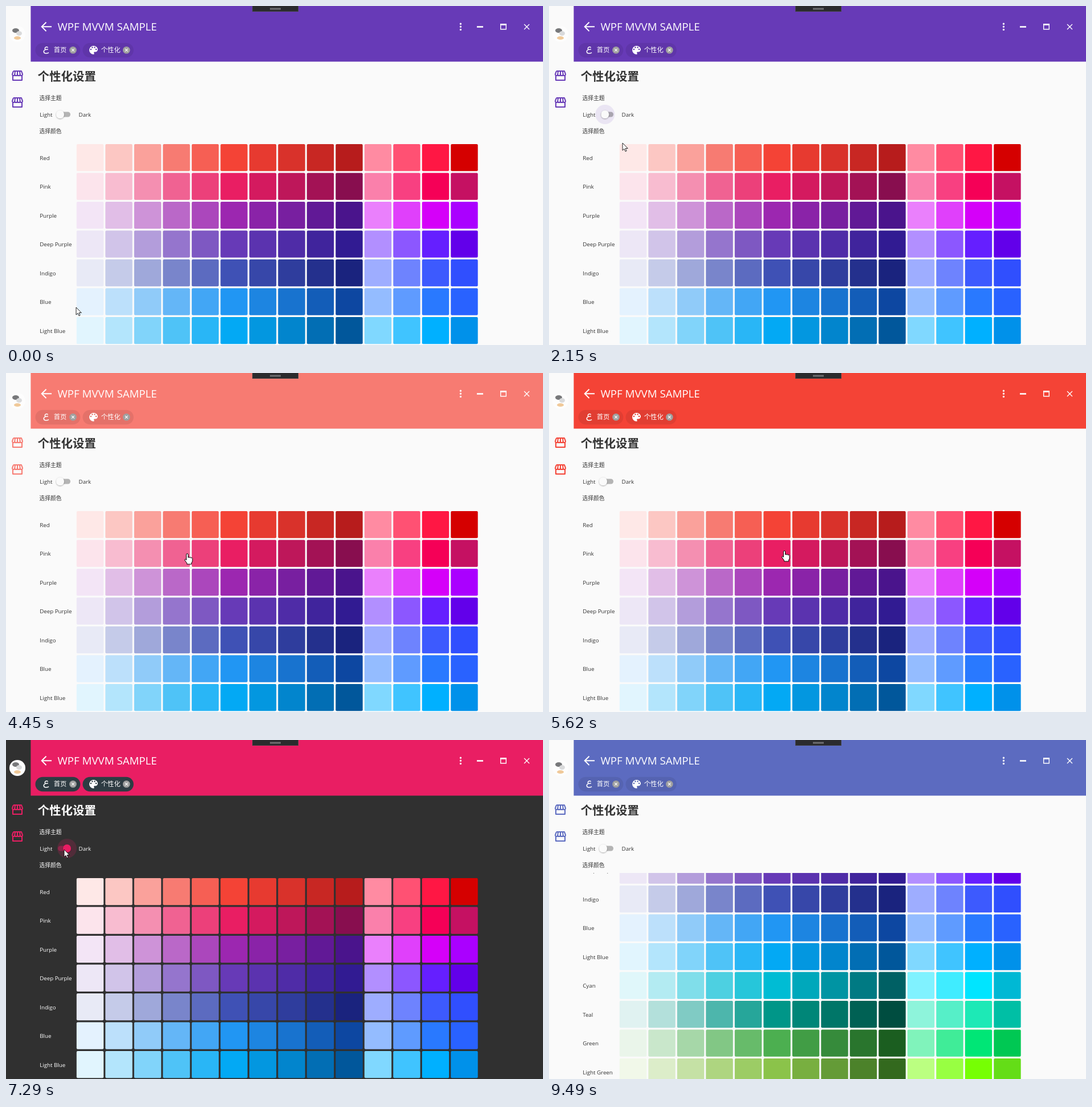
Recreate the animation shown at these times as an HTML page. Size 942 by 594 pixels, loop 9.77 s.

```html
<!DOCTYPE html>
<html lang="zh">
<head>
<meta charset="utf-8">
<title>Theme settings</title>
<style>
html, body { margin: 0; width: 100%; height: 100%; overflow: hidden; background: #fafafa; }
svg { display: block; width: 942px; height: 594px; font-family: "Open Sans", "Noto Sans CJK SC", "Noto Sans CJK", sans-serif; }
.cjk { font-family: "Noto Sans CJK SC", "Noto Sans CJK", sans-serif; }
.label { font-size: 9.75px; }
.line { fill: none; stroke-linejoin: round; }
</style>
</head>
<body>
<svg viewBox="0 0 942 594">
  <defs>
    <clipPath id="view"><rect x="43" y="233" width="899" height="361"/></clipPath>
    <clipPath id="cell"><rect id="cellRect" width="47.4" height="47.4" rx="2"/></clipPath>
    <filter id="soft" x="-50%" y="-50%" width="200%" height="200%">
      <feDropShadow dx="0" dy=".8" stdDeviation=".9" flood-opacity=".4"/>
    </filter>
    <path id="store" class="line" stroke-width="2" transform="translate(-12 -12)" d="M5 4H19L20.9 9.1C21.4 12.9 17.2 13 16.7 9.7L16 4M16.7 9.7C16.6 12.9 12 12.9 12 9.7V4M12 9.7C12 12.9 7.4 12.9 7.3 9.7L8 4M7.3 9.7C6.8 13 2.6 12.9 3.1 9.1L5 4M4 12V20H20V12"/>
    <g id="remove">
      <circle r="6.3" fill="#a0a0a0"/>
      <path d="M-2.4-2.4L2.4 2.4M2.4-2.4L-2.4 2.4" stroke="#fff" stroke-width="1.2"/>
    </g>
  </defs>

  <rect id="page" width="942" height="594"/>
  <rect id="header" x="43.4" width="899" height="97.5"/>

  <circle cx="20" cy="49" r="14" fill="#fdfdfd"/>
  <ellipse cx="17" cy="43" rx="6" ry="4" fill="#77787a"/>
  <ellipse cx="23" cy="48" rx="5" ry="4" fill="#d9dadb"/>
  <ellipse cx="20" cy="56" rx="6" ry="3" fill="#f0c999"/>

  <g id="icons">
    <use href="#store" x="20" y="122"/>
    <use href="#store" x="20" y="169"/>
  </g>

  <g fill="none" stroke="#fff">
    <path d="M80 36.3H63.5M70.5 28.5L62.7 36.3L70.5 44.1" stroke-width="2"/>
    <path d="M826 36.5H837" stroke-width="2.6"/>
    <path d="M867.7 33V40.8H877.3V33" stroke-width="1.4"/>
    <path d="M867 32.4H878" stroke-width="2.8"/>
    <path d="M909 32L918 41M918 32L909 41" stroke-width="1.4"/>
    <path d="M797.5 31.2V41.5" stroke-width="3.4" stroke-linecap="round" stroke-dasharray="0 5.1"/>
  </g>
  <text x="90.5" y="42.5" font-size="18.7" fill="#fff">WPF MVVM SAMPLE</text>

  <g id="chips">
    <rect x="51.5" y="64.8" width="78.8" height="25.4" rx="12.7"/>
    <rect x="134.5" y="64.8" width="89.3" height="25.4" rx="12.7"/>
  </g>
  <path class="line" stroke="#fff" stroke-width="1.5" d="M73.6 72.8C70.5 70.4 66.4 73.3 69.2 76.4L73.8 75.8M69.2 76.4C64.6 78.2 65.8 83 70 83Q73 83 75 81.6"/>
  <path fill="#fff" fill-rule="evenodd" transform="translate(143.5 67.2) scale(.833)" d="M12 3A9 9 0 0 0 12 21A1.5 1.5 0 0 0 13.5 19.5C13.5 19.1 13.35 18.8 13.1 18.5C12.9 18.2 12.7 17.9 12.7 17.5A1.5 1.5 0 0 1 14.2 16H16A5 5 0 0 0 21 11C21 6.6 17 3 12 3ZM16 10.5a1.5 1.5 0 1 0 3 0a1.5 1.5 0 1 0-3 0ZM13 6.5a1.5 1.5 0 1 0 3 0a1.5 1.5 0 1 0-3 0ZM8 6.5a1.5 1.5 0 1 0 3 0a1.5 1.5 0 1 0-3 0ZM5 10.5a1.5 1.5 0 1 0 3 0a1.5 1.5 0 1 0-3 0Z"/>
  <g class="cjk" fill="#fff" font-size="11.3">
    <text x="83.8" y="81.2">首页</text>
    <text x="166.8" y="81.2">个性化</text>
  </g>
  <use href="#remove" x="117.5" y="77.3"/>
  <use href="#remove" x="211.3" y="77.3"/>

  <rect x="432.5" y="-.5" width="80" height="10" fill="#2b2b2d" stroke="#434345"/>
  <rect x="463" y="3.5" width="19" height="3" fill="#6e6e70"/>

  <g id="ink">
    <text class="cjk" x="55.6" y="131" font-size="20.5" font-weight="700">个性化设置</text>
    <g class="label">
      <text class="cjk" x="58.6" y="165">选择主题</text>
      <text x="59.2" y="194">Light</text>
      <text x="127.6" y="194">Dark</text>
      <text class="cjk" x="58.6" y="222.5">选择颜色</text>
    </g>
    <g clip-path="url(#view)"><g id="grid" class="label"></g></g>
  </g>

  <circle id="halo" cy="190" r="17"/>
  <rect id="track" x="91" y="185.5" width="22" height="9" rx="4.5"/>
  <circle id="knob" cy="190" r="7" filter="url(#soft)"/>

  <g id="cursor" fill="#fff" stroke="#000">
    <path id="arrow" stroke-width="1.1" transform="scale(.78)" d="M0 0V16.8L3.8 13.2 6.4 19 9 17.9 6.5 12.2H11.8Z"/>
    <path id="hand" stroke-width="1" stroke-linejoin="round" d="M-1.7 1.2a1.6 1.6 0 0 1 3.2 0V6.5a1.4 1.4 0 0 1 2.7.3a1.3 1.3 0 0 1 2.6.6a1.2 1.2 0 0 1 2.2 1V13l-1.6 3V18H-.6V16.2L-4.4 11c-.6-1.4 1-2.3 2-1.2l.7.9Z"/>
  </g>
</svg>

<script>
const LOOP = 9770, LEFT = 123.8, TOP = 241.9, PITCH = 50.5, SIZE = 47.4;

// Each hue: main colour, darkest shade, accent, deep accent.
const HUES = {
  'Red': 'f44336 b71c1c ff1744 d50000',
  'Pink': 'e91e63 880e4f f50057 c51162',
  'Purple': '9c27b0 4a148c d500f9 aa00ff',
  'Deep Purple': '673ab7 311b92 651fff 6200ea',
  'Indigo': '3f51b5 1a237e 3d5afe 304ffe',
  'Blue': '2196f3 0d47a1 2979ff 2962ff',
  'Light Blue': '03a9f4 01579b 00b0ff 0091ea',
  'Cyan': '00bcd4 006064 00e5ff 00b8d4',
  'Teal': '009688 004d40 1de9b6 00bfa5',
  'Green': '4caf50 1b5e20 00e676 00c853',
  'Light Green': '8bc34a 33691e 76ff03 64dd17'
};
const TINTS = [.12, .3, .5, .7, .85, 1], DARKS = [.22, .44, .72, 1], ACCENTS = [.5, .75, 1];

// Cursor stops: time, x, y and whether it clicks there.
const STOPS = [
  [0, 123, 528], [930, 95, 190], [1180, 95, 190, true], [2011, 95, 190, true], [2150, 129, 240],
  [3250, 191, 270, true], [3280, 245.5, 273], [3650, 248, 274, true], [3930, 298, 275, true],
  [4450, 318, 317], [4800, 348, 274, true], [5200, 398, 274, true], [5500, 412, 322], [5620, 413, 312],
  [5720, 413, 312, true], [6590, 102, 192], [6876, 102, 192, true], [7830, 102, 192, true],
  [8480, 349, 417, true], [8610, 350.5, 472], [8890, 350.5, 472, true]
];

// The screen refreshes in bursts (first, last) about every STEP ms.
const STEP = 139;
const BURSTS = [[120, 930], [1180, 2150], [2270, 3280], [3430, 4450], [4570, 5500],
  [5620, 6590], [6740, 7690], [7830, 8610], [8910, 9490]];

const el = id => document.getElementById(id);
const set = (node, attrs) => { for (const k in attrs) node.setAttribute(k, attrs[k]); return node; };
const add = (parent, tag, attrs) =>
  parent.appendChild(set(document.createElementNS('http://www.w3.org/2000/svg', tag), attrs));
const clamp = v => Math.max(0, Math.min(1, v));
const mix = (a, b, p) => a + (b - a) * p;
const ease = p => p * p * (3 - 2 * p);
const cellOf = ([, x, y]) => [Math.floor((y - TOP) / PITCH), Math.floor((x - LEFT) / PITCH)];

function shades(list) {
  const [main, dark, accent, deep] = list.split(' ').map(h => [0, 2, 4].map(i => parseInt(h.slice(i, i + 2), 16)));
  const white = [255, 255, 255];
  const ramp = (from, to, steps) =>
    steps.map(p => `rgb(${from.map((v, i) => Math.round(mix(v, to[i], p)))})`);
  return [...ramp(white, main, TINTS), ...ramp(main, dark, DARKS), ...ramp(white, accent, ACCENTS), `rgb(${deep})`];
}

const colors = Object.values(HUES).map(shades);
const grid = el('grid');
Object.keys(HUES).forEach((name, r) => {
  const y = TOP + r * PITCH;
  add(grid, 'text', { x: 59.2, y: y + 28 }).textContent = name;
  colors[r].forEach((fill, c) => add(grid, 'rect', { x: LEFT + c * PITCH, y, width: SIZE, height: SIZE, rx: 2, fill }));
});
const ripple = add(grid, 'circle', { fill: '#fff', 'clip-path': 'url(#cell)' });

const clicks = STOPS.filter(s => s[3]);
const picks = clicks.filter(s => s[2] > TOP);
const switches = clicks.filter(s => s[2] < TOP);

function snap(t) {
  const burst = BURSTS.filter(b => b[0] <= t).pop();
  if (!burst) return 0;
  const [from, to] = burst, n = Math.round((to - from) / STEP), gap = (to - from) / n;
  return from + gap * Math.min(n, Math.floor((t - from) / gap + 1e-6));
}

function cursorAt(t) {
  const i = STOPS.findIndex(s => s[0] > t);
  if (i < 0) return STOPS[STOPS.length - 1].slice(1, 3);
  const a = STOPS[i - 1], b = STOPS[i], p = ease((t - a[0]) / (b[0] - a[0]));
  return [mix(a[1], b[1], p), mix(a[2], b[2], p)];
}

function drawRipple(t, pick) {
  const age = pick ? t - pick[0] : Infinity;
  const opacity = .27 * clamp((350 - age) / 200);
  set(ripple, { opacity });
  if (!opacity) return;
  const [row, col] = cellOf(pick);
  set(el('cellRect'), { x: LEFT + col * PITCH, y: TOP + row * PITCH });
  set(ripple, { cx: pick[1], cy: pick[2], r: Math.max(0, age) * .37 });
}

function drawToggle(t, dark, last, primary) {
  const p = last ? clamp((t - last[0]) / 190) : 1;
  const on = dark ? p : 1 - p;
  const cx = mix(95, 107, on);
  set(el('knob'), { cx, fill: dark ? primary : '#fafafa' });
  set(el('track'), { fill: dark ? primary : '#000', opacity: dark ? .38 : .28 });
  set(el('halo'), { cx, fill: primary, opacity: dark ? .18 : on > 0 ? .11 : 0 });
}

function drawCursor(t) {
  const [x, y] = cursorAt(t);
  const inside = (v, start) => v >= start && (v - start) % PITCH <= SIZE;
  const over = inside(x, LEFT) && inside(y, TOP);
  set(el('cursor'), { transform: `translate(${x} ${y})`, opacity: t > 9400 ? 0 : 1 });
  set(el('arrow'), { opacity: over ? 0 : 1 });
  set(el('hand'), { opacity: over ? 1 : 0 });
}

function draw(time) {
  const t = snap(time);
  const past = list => list.filter(s => s[0] <= t + .5);
  const flips = past(switches), dark = flips.length % 2 === 1;
  const pick = past(picks).pop();
  const [row, col] = pick ? cellOf(pick) : [3, 5];
  const primary = colors[row][col];
  set(el('page'), { fill: dark ? '#303030' : '#fafafa' });
  set(el('header'), { fill: primary });
  set(el('icons'), { stroke: primary });
  set(el('chips'), { fill: dark ? '#2e3c43' : 'rgba(0,0,0,.08)' });
  set(el('ink'), { fill: dark ? '#fff' : '#333' });
  set(grid, { transform: `translate(0 ${-189 * clamp((t - 9055) / 435)})` });
  drawRipple(t, pick);
  drawToggle(t, dark, flips.pop(), primary);
  drawCursor(t);
}

const start = performance.now();
function tick() {
  draw((performance.now() - start) % LOOP);
  requestAnimationFrame(tick);
}
tick();
</script>
</body>
</html>
```
